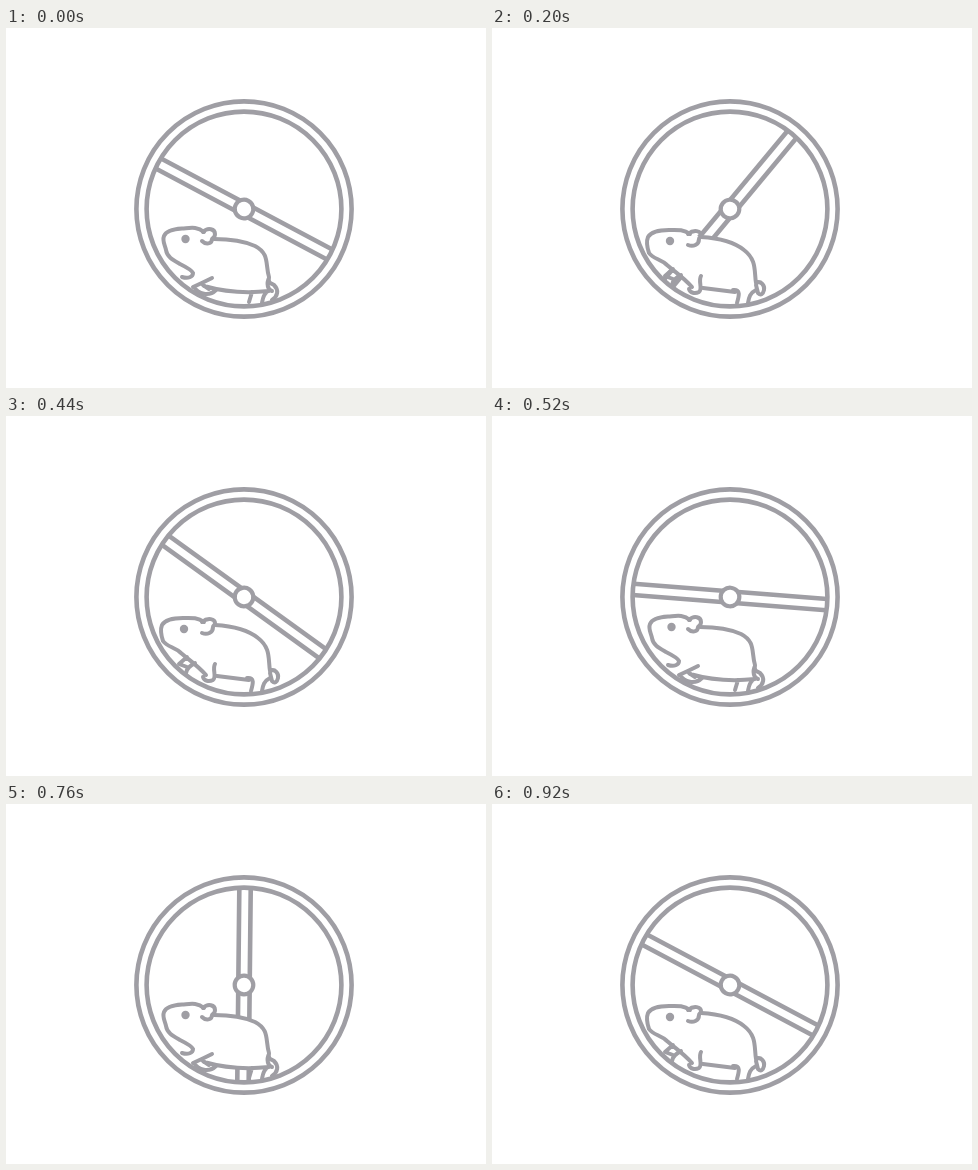
Animation of 480 by 360 pixels, one loop 0.96 s. Source, as an HTML page:

```html
<!DOCTYPE html>
<html lang="en">
<head>
<meta charset="utf-8">
<title>Hamster wheel</title>
<style>
  html, body { margin: 0; width: 100%; height: 100%; overflow: hidden; background: #fff; }
  svg { display: block; width: 100vw; height: 100vh; }
  .line { fill: none; stroke: #9f9ea4; stroke-width: 4; stroke-linecap: round; stroke-linejoin: round; }
  .wheel { stroke-width: 4.6; stroke-linecap: butt; }
  .skin { fill: #fff; }
  .eye { fill: #9f9ea4; }
</style>
</head>
<body>
<svg viewBox="0 0 480 360">
  <g id="bar" class="line wheel">
    <path d="M-97 -5.7H97M-97 5.7H97"/>
    <circle r="9.3" fill="#fff" stroke-width="4.2"/>
  </g>
  <g id="poses"></g>
  <g class="line wheel">
    <circle cx="238" cy="181" r="107.6"/>
    <circle cx="238" cy="181" r="97.4"/>
  </g>
</svg>
<script>
const STEP = 40, LOOP = 960, TURN = 360 / 23, START = 28;

// Each pose: head from ear to chest, back from ear to rump, belly, limbs, ear, eye.
const poses = [
  { // stretched
    head: "M198 204C191 198 184 200 176 200.500C168 201 160 203 158 208C156 213 159 217 160 222C161 229 167 232 174 236C180 239 186 242 187 245C187 249 182 251 176 249",
    back: "M208 211C226 211 238 213 249 218C264 226 259 236 263 249",
    hull: "L266 263L240 265L212 262L187 256Z",
    limbs: "M206 250C200 253 194 256 187 259M198 258C212 262 236 266 263 263M188 259C192 266 203 269 210 262M197 257L203 261M263 249C262 256 265 255 268 257C273 262 272 268 266 272M263 250C260 256 262 262 266 263M246 264L243 274M261 264C257 267 257 270 256 275",
    ear: "M197 204C202 199 209 201 209 206C209 210 206 210 206 211C206 216 200 217 196 213",
    eye: [179.5, 211]
  },
  { // pushing off
    head: "M202 206C195 201 188 202 182 202.500C173 203 164 204 161 209C159 214 160 219 162 224C166 232 173 237 180 242C186 246 193 249 193 252C193 255 190 258 187 260",
    back: "M211 211C226 212 242 216 252 222C267 231 266 239 267 249C269 257 268 264 267 272",
    hull: "L257 267L246 264L203 259L192 254Z",
    limbs: "M210 250C203 255 199 260 196 267M203 259C218 264 236 263 251 266M246 263L258 267L256 274",
    ear: "M200 206C206 202 212 203 212 207C212 211 210 210 210 212C209 217 204 218 199 215",
    eye: [182, 213.5]
  },
  { // gathered
    head: "M198 206C191 201 184 202 177 202C168 202 159 204 156 209C154 214 155 219 157 225C161 231 169 231 175 237C183 244 191 249 200 259",
    back: "M209 209C226 210 241 213 252 222C265 232 262 243 264 255",
    hull: "L263 264L244 264L210 260L200 259Z",
    limbs: "M209 248C206 253 211 261 207 264C203 266 198 265 197 261M211 260L243 264M181 241L173 248L181 251M189 247C184 250 181 252 180 257M241 262C249 261 247 268 245 275M264 255C269 252 273 258 272 262C271 266 269 268 266 265L264 257M264 262C258 265 257 269 256 275",
    ear: "M196 206C202 201 209 203 209 207C209 210 207 209 207 211C207 217 201 219 196 217",
    eye: [178, 213]
  }
];

const reverse = d => {
  const n = d.match(/[\d.]+/g), pts = [];
  for (let i = n.length; i > 0; i -= 2) pts.push(n[i - 2] + " " + n[i - 1]);
  return "M" + pts[0] + "C" + pts.slice(1).join(" ");
};

function draw(p) {
  const body = reverse(p.head) + p.back.replace("M", "L") + p.hull;
  return `<g><path class="skin" d="${body}"/>
    <path class="line" d="${p.head}${p.back}${p.limbs}"/>
    <path class="line" d="${p.ear}"/>
    <circle class="eye" cx="${p.eye[0]}" cy="${p.eye[1]}" r="4.2"/></g>`;
}

const holder = document.getElementById("poses");
const bar = document.getElementById("bar");
holder.innerHTML = poses.map(draw).join("");
const groups = [...holder.children];

function render(now) {
  const k = Math.floor((now % LOOP) / STEP);
  const pose = Math.floor(k / 2) % poses.length;
  bar.setAttribute("transform", `translate(238 181) rotate(${START - k * TURN})`);
  groups.forEach((g, i) => g.setAttribute("display", i === pose ? "inline" : "none"));
}

let origin;
function tick(now) {
  origin ??= now;
  render(now - origin);
  requestAnimationFrame(tick);
}
render(0);
requestAnimationFrame(tick);
</script>
</body>
</html>
```
